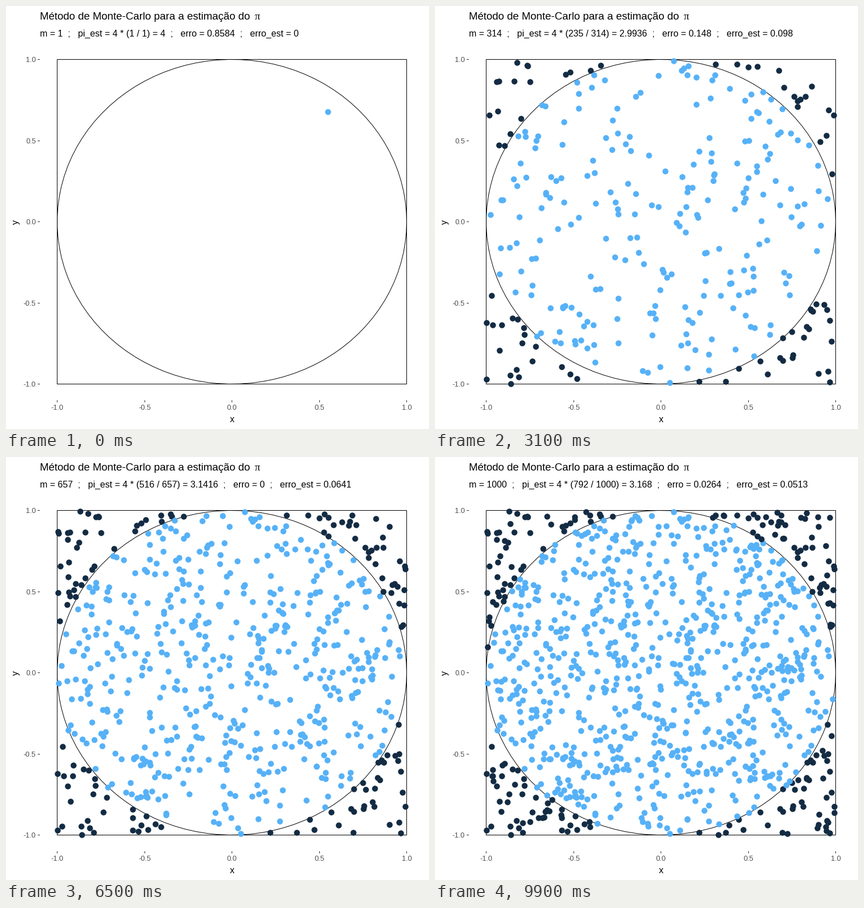
A matplotlib script for the animation above (10000 ms loop, 748 by 748 pixels).

```python
import random

import matplotlib.pyplot as plt
import numpy as np
from matplotlib.animation import FuncAnimation

SIZE, DPI = 748, 100
PX = 72 / DPI  # points per pixel
FRAMES, INTERVAL = 100, 100
N, SEED = 1000, 666
INSIDE, OUTSIDE = "#56B1F7", "#132B43"
TICK, LABEL = "#333333", "#4D4D4D"

plt.rcParams["font.family"] = ["Liberation Sans", "DejaVu Sans"]


def uniform(count, seed):
    """Uniform numbers in [0, 1), as R's set.seed() and runif() give them."""
    def step(s):
        return (69069 * s + 1) % 2**32

    for _ in range(51):
        seed = step(seed)
    key = []
    for _ in range(624):
        seed = step(seed)
        key.append(seed)
    rng = random.Random()
    rng.setstate((3, (*key, 624), None))
    return np.array([rng.getrandbits(32) / 2**32 for _ in range(count)])


def to_px(x, y):
    return 399.5 + 309 * np.asarray(x), 381.5 - 287 * np.asarray(y)


def snap(v):
    """Centre of the pixel that holds v."""
    return np.floor(v) + 0.5


def number(v):
    """Four decimals without trailing zeros, short values in e-notation."""
    v = round(v, 4)
    return f"{v:.0e}" if 0 < v < 0.00095 else f"{v:g}"


def status(m):
    hits = int(inside[:m].sum())
    p = hits / m
    error = abs(4 * p - np.pi)
    spread = 4 * np.sqrt(p * (1 - p) / m)
    return "  ;   ".join([
        f"m = {m}",
        f"pi_est = 4 * ({hits} / {m}) = {number(4 * p)}",
        f"erro = {number(error)}",
        f"erro_est = {number(spread)}",
    ])


x, y = 2 * uniform(2 * N, SEED).reshape(2, N) - 1
inside = x**2 + y**2 <= 1
dots = np.column_stack([snap(v) for v in to_px(x, y)])

fig = plt.figure(figsize=(SIZE / 100, SIZE / 100), dpi=DPI, facecolor="white")
ax = fig.add_axes([0, 0, 1, 1])
ax.set(xlim=(0, SIZE), ylim=(SIZE, 0))
ax.axis("off")


def line(xs, ys, color="black"):
    ax.plot(xs, ys, color=color, lw=PX, snap=False,
            solid_capstyle="butt", solid_joinstyle="miter")


def text(tx, ty, s, size, **kw):
    return ax.text(tx, ty, s, fontsize=size * PX, va="baseline", **kw)


# Square and circle
line(*to_px([-1, 1, 1, -1, -1], [-1, -1, 1, 1, -1]))
angle = np.linspace(0, 2 * np.pi, 100)
line(*to_px(np.cos(angle), np.sin(angle)))

# Axes
for v in np.arange(-1, 1.5, 0.5):
    tx, ty = to_px(v, v)
    line([56, 60], [snap(ty)] * 2, TICK)
    line([snap(tx)] * 2, [697, 701], TICK)
    text(52.8, ty + 4.8, f"{v:.1f}", 12.8, ha="right", color=LABEL)
    text(tx, 714.4, f"{v:.1f}", 12.8, ha="center", color=LABEL)
text(399.5, 736, "x", 16, ha="center")
text(21.5, 381.5, "y", 16, ha="center", rotation=90, rotation_mode="anchor")

# Titles
text(60, 24, "Método de Monte-Carlo para a estimação do", 18.8)
text(440, 24, "π", 19, family="Liberation Serif")
subtitle = text(60, 54, "", 16)

points = ax.scatter(*dots.T, s=(10.5 * PX) ** 2, linewidths=0, zorder=3,
                    c=np.where(inside, INSIDE, OUTSIDE), snap=False)


def update(i):
    m = round(1 + i * (N - 1) / (FRAMES - 1))
    points.set_offsets(dots[:m])
    subtitle.set_text(status(m))
    return points, subtitle


anim = FuncAnimation(fig, update, frames=FRAMES, interval=INTERVAL,
                     repeat=True, repeat_delay=0)
plt.show()
```
